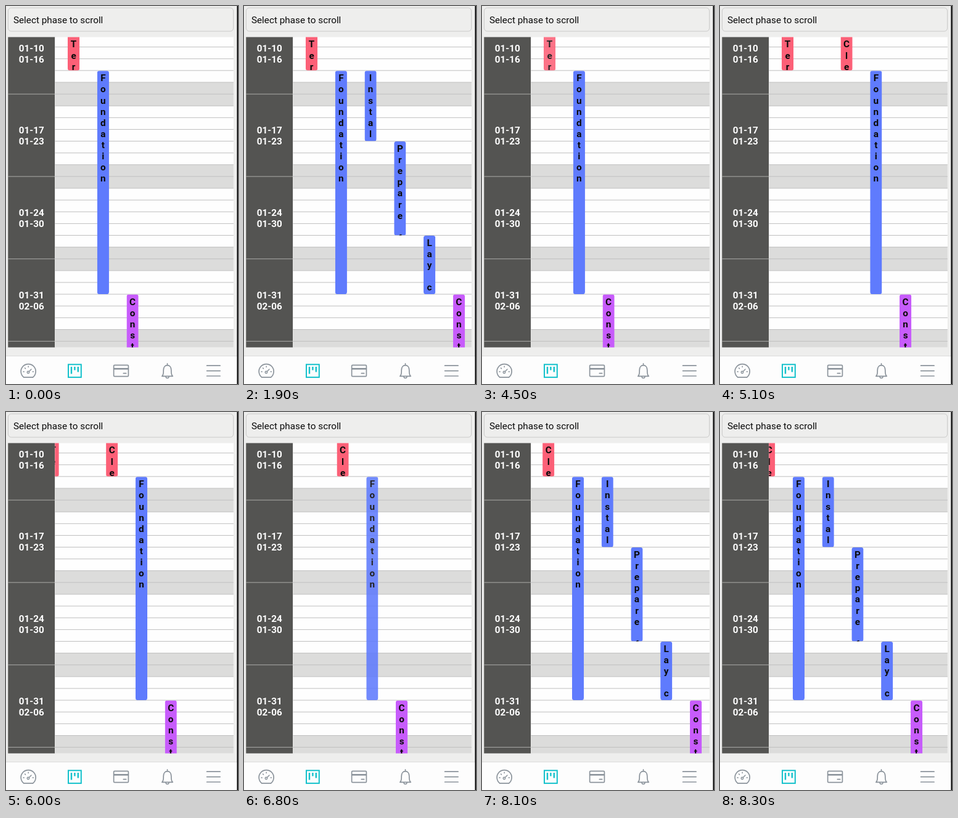
These frames come from a looping animation (376x614 px, 10000 ms). An HTML page:

```html
<!DOCTYPE html>
<html lang="en">
<head>
<meta charset="utf-8">
<title>Phase schedule</title>
<style>
  html, body { margin: 0; width: 100%; height: 100%; overflow: hidden; background: #eeeeed; }
  svg { display: block; }
  text { font: 15.3px Roboto, sans-serif; fill: #0a0a0a; }
  .bold { font-weight: 700; text-anchor: middle; }
</style>
</head>
<body>
<svg id="stage" width="376" height="614" viewBox="0 0 376 614">
  <rect x="3.5" y="3" width="365" height="38" rx="5" fill="none" stroke="#c9c9c8"/>
  <text x="11.9" y="28">Select phase to scroll</text>
  <svg id="dates" x="3.3" y="50.6" width="76" height="504" viewBox="3.3 50.6 76 504"></svg>
  <svg id="chart" x="79.3" y="50.6" width="289.5" height="504" viewBox="79.3 50.6 289.5 504"></svg>
  <rect y="568" width="376" height="46" fill="#fdfdfd"/>
  <rect y="568" width="376" height="1" fill="#dcdcdc"/>
  <g fill="none" stroke="#8b939b" stroke-width="1.7" stroke-linecap="round" stroke-linejoin="round">
    <path d="M29 603.2A12 12 0 1 1 43.4 603.2Z"/>
    <path d="M37.3 593.7L41 590M28 594h1.3M43.2 594h1.3M30.6 588l.9.9M36.2 585.2v1.3" stroke-width="1.5"/>
    <circle cx="36" cy="595" r="1.7" stroke-width="1.5"/>
    <g stroke="#13c1cb" stroke-width="2" stroke-linecap="butt" stroke-linejoin="miter">
      <rect x="101" y="582.3" width="20.8" height="20.8"/>
      <path d="M106 586v11.5M111.4 586v5.5M116.8 586v8.5" stroke-width="2.4"/>
    </g>
    <rect x="174.6" y="583.3" width="23.8" height="18.4" rx="1.5"/>
    <path d="M175 589.3h23" stroke-width="2.6" stroke-linecap="butt"/>
    <path d="M190.3 596.6h4.4"/>
    <path d="M252.8 601.3C255.6 599 255.2 596 255.2 591.5C255.2 586.5 257.8 583.6 261.5 583.6S267.8 586.5 267.8 591.5C267.8 596 267.4 599 270.2 601.3Z"/>
    <path d="M261.5 580.8v2.5M259 602.6a2.6 2.6 0 0 0 5 0"/>
    <path d="M325.5 584.2h21.5M325.5 592.6h21.5M325.5 601h21.5"/>
  </g>
  <rect x="374.3" width="2" height="614" fill="#0c0c0c"/>
</svg>
<script>
const LOOP = 10000, FRAME = 100;
const COL0 = 100, PITCH = 47.75, BAR_W = 19.2, LETTER = 18.1;
const rowY = n => 66.6 + n * 19.12;
const dates = document.getElementById('dates');
const chart = document.getElementById('chart');

function add(parent, tag, attrs, text = '') {
  const el = document.createElementNS('http://www.w3.org/2000/svg', tag);
  for (const key in attrs) el.setAttribute(key, attrs[key]);
  el.textContent = text;
  return parent.appendChild(el);
}
const box = (parent, y, height, fill) =>
  add(parent, 'rect', { x: 0, y, width: 376, height, fill });
const bold = (parent, x, y, text, fill = '#0a0a0a') =>
  add(parent, 'text', { class: 'bold', x, y, style: `fill:${fill}` }, text);

// Calendar: one dark cell and one shaded weekend per week, a line per day.
const dayLabel = n => new Date(Date.UTC(2022, 0, n)).toISOString().slice(5, 10);
box(dates, 0, 614, '#545452');
box(chart, 0, 614, '#fefefe');
for (let week = 0; week < 4; week++) {
  const end = rowY(4 + 7 * week), first = 10 + 7 * week;
  bold(dates, 41.2, end - 69.5, dayLabel(first), '#fff');
  bold(dates, 41.2, end - 51.5, dayLabel(first + 6), '#fff');
  box(dates, end - .5, 1, '#acacaa');
  box(chart, rowY(3 + 7 * week), rowY(2) - rowY(0), '#dcdcdb');
}
for (let n = 0; n < 26; n++) box(chart, rowY(n) - .5, 1, '#bfbfbf');

const RED = '#fc6077', BLUE = '#5f7bfd', PURPLE = '#c75cfb';
function bar(label, color, from, to) {
  const group = add(chart, 'g', {});
  const y = rowY(from) + .5, height = rowY(to) - y;
  const clip = add(group, 'svg', { y, width: BAR_W, height });
  add(clip, 'rect', { width: BAR_W, height, rx: 3.5, fill: color });
  [...label].forEach((ch, i) => bold(clip, BAR_W / 2, 17 + i * LETTER, ch));
  return group;
}
// The first phase starts above the visible range, so its top is cut off.
function earlyBar(label) {
  const group = bar('', RED, -2, 2);
  [...label].forEach((ch, i) => bold(group, BAR_W / 2, 67.4 + i * LETTER, ch));
  return group;
}
const terrain = earlyBar('Ter'), clear = earlyBar('Cle');
const foundation = bar('Foundation', BLUE, 2, 21);
const parts = [bar('Install', BLUE, 2, 8), bar('Prepare f', BLUE, 8, 16), bar('Lay c', BLUE, 16, 21)];
const build = bar('Const', PURPLE, 21, 30);

// A press dims its bar and toggles it on release; a drag scrolls sideways.
const presses = [
  { on: foundation, down: 1150, up: 1650 },
  { on: foundation, down: 2750, up: 3300 },
  { on: terrain, down: 4350, up: 4850 },
  { on: foundation, down: 6650, up: 7250 }
];
const drags = [
  { from: 5900, to: 6100, by: 40 },
  { from: 6200, to: 6400, by: 5 },
  { from: 8000, to: 8300, by: 80.4 }
];
const ramp = (t, from, to) => Math.min(1, Math.max(0, (t - from) / (to - from)));
const easeOut = p => 1 - (1 - p) ** 2.6;
const isOpen = (el, t) => presses.filter(p => p.on === el && t >= p.up).length % 2;

function opacity(el, t) {
  return presses.filter(p => p.on === el).reduce((sum, p) =>
    sum - .12 * ramp(t, p.down, p.down + 150) * (1 - ramp(t, p.up, p.up + 250)), 1);
}

function draw(t) {
  const scroll = drags.reduce((sum, d) => sum + d.by * easeOut(ramp(t, d.from, d.to)), 0);
  const open = isOpen(foundation, t), cleared = isOpen(terrain, t);
  const place = (el, col, shown = true) => {
    el.setAttribute('visibility', shown ? 'visible' : 'hidden');
    el.setAttribute('transform', `translate(${COL0 + PITCH * col - scroll} 0)`);
    el.setAttribute('opacity', opacity(el, t));
  };
  const col = cleared ? 3 : 1;
  place(terrain, 0);
  place(clear, 2, cleared);
  place(foundation, col);
  parts.forEach((el, i) => place(el, col + 1 + i, open));
  place(build, col + (open ? 4 : 1));
}

const start = performance.now();
function tick() {
  const t = (performance.now() - start) % LOOP;
  draw(Math.floor(t / FRAME) * FRAME);
  requestAnimationFrame(tick);
}
tick();
</script>
</body>
</html>
```
